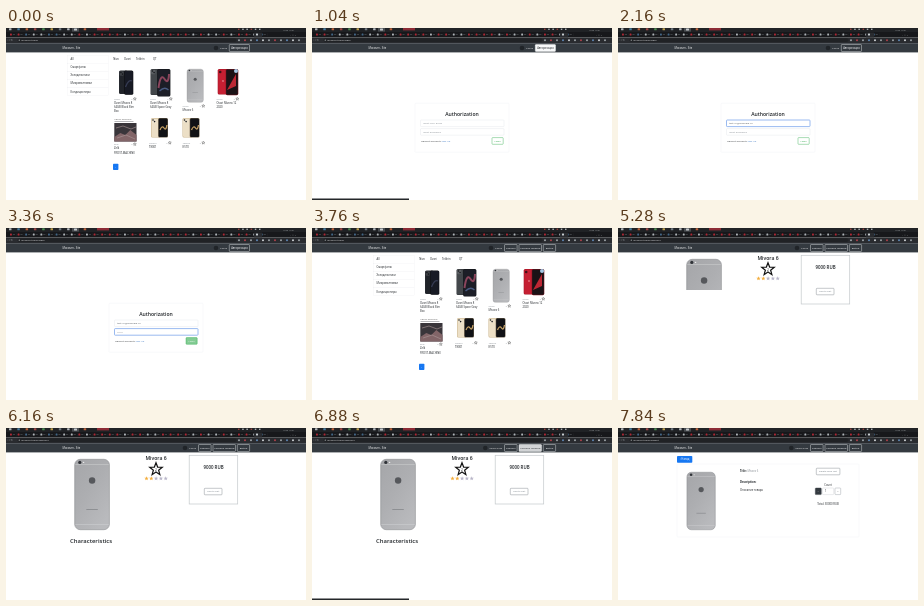
An HTML page that plays this animation: 300x172 px, repeating every 8000 ms.

```html
<!DOCTYPE html>
<html lang="ru">
<head>
<meta charset="utf-8">
<title>Магазин</title>
<style>
html, body { margin: 0; width: 100%; height: 100%; overflow: hidden; background: #fff; }
svg { display: block; width: 100%; height: 100%; }
text { font-family: "Open Sans", "Noto Sans", sans-serif; white-space: pre; }
</style>
</head>
<body>
<svg id="stage" viewBox="0 0 300 172"></svg>
<script>
const LOOP = 8000;
const INK = '#212529', MUTED = '#868c92', LINE = '#e1e4e7', BAR = '#343a40', BLUE = '#1677f2', GREEN = '#28a745';

// Markup helpers
const rect = (x, y, w, h, fill, more = '') =>
  `<rect x="${x}" y="${y}" width="${w}" height="${h}" fill="${fill}" ${more}/>`;
const disc = (x, y, r, fill, more = '') => `<circle cx="${x}" cy="${y}" r="${r}" fill="${fill}" ${more}/>`;
const text = (x, y, s, size = 2.7, fill = INK, more = '') =>
  `<text x="${x}" y="${y}" font-size="${size}" fill="${fill}" ${more}>${s}</text>`;
const swirl = (d, color, w) => `<path d="${d}" fill="none" stroke="${color}" stroke-width="${w}"/>`;
const mid = 'text-anchor="middle"', bold = 'font-weight="600"';
const outline = (x, y, w, h, color, fill = 'none', more = '') =>
  rect(x, y, w, h, fill, `rx=".7" stroke="${color}" stroke-width=".4" ${more}`);
const button = (id, x, y, w, h, label, color, size = 2.4) =>
  outline(x, y, w, h, color, 'transparent', `id="${id}"`) +
  text(x + w / 2, y + h / 2 + .8, label, size, color, `${mid} id="${id}Text"`);
const group = (id, s) => `<g id="${id}">${s}</g>`;

function star(x, y, r, fill, stroke = 'none', sw = 0) {
  const pts = Array.from({ length: 10 }, (_, i) => {
    const a = i * Math.PI / 5 - Math.PI / 2, k = i % 2 ? r * .42 : r;
    return (x + k * Math.cos(a)).toFixed(2) + ',' + (y + k * Math.sin(a)).toFixed(2);
  });
  return `<polygon points="${pts.join(' ')}" fill="${fill}" stroke="${stroke}" stroke-width="${sw}"/>`;
}

function seeded(seed) {
  return () => (seed = (seed * 16807) % 2147483647) / 2147483647;
}

// Browser frame
function chrome() {
  const rnd = seeded(41);
  let s = rect(0, 0, 300, 4, '#202225') + rect(0, 4, 300, 5.4, '#17181b') + rect(0, 9.4, 300, 5.8, '#292b2f');
  const apps = ['#b3b8bc', '#467c9f', '#b8613b', '#9c4746', '#4b8b51', '#b99d4d', '#727b83'];
  for (let i = 0; i < 10; i++) s += rect(3 + i * 8.3, .3, 2.5, 2, apps[i % 7], 'rx=".5"');
  s += rect(66, 0, 7, 3.6, '#484c50') + rect(68, .4, 3, 2, '#c4c8cb', 'rx=".5"');
  s += rect(91, 0, 12, 2.4, '#8c2b35');
  for (let i = 0; i < 6; i++) s += rect(232 + i * 4.2, .6, 1.5, 1.4, i % 3 ? '#a8adb0' : '#91423e');
  s += text(277, 2.6, '12:45  13.01', 2, '#b6babd');
  for (let i = 0; i < 34; i++) {
    const x = 4 + i * 7.6, c = rnd();
    s += rect(x, 5.6, 1.9, 1.9, c < .68 ? '#ad2834' : c < .86 ? '#aeb3b7' : '#426686', 'rx=".5"') +
      rect(x + 2.8, 6.2, 2.2, .6, '#55595d') + rect(x + 6.3, 5.2, .2, 3, '#34373b');
  }
  s += rect(248, 4.6, 8, 4.8, '#292b2f') + rect(250, 5.6, 2, 1.9, '#c7cdd1', 'rx=".5"');
  s += text(284, 7.7, '–  □  ×', 2.2, '#a2a6aa');
  s += text(1.5, 13.3, '‹ › ↻', 2.7, '#aeb2b6') + rect(11.5, 10.3, 219, 3.8, '#202225', 'rx="1.8"');
  s += disc(13.3, 12.2, .6, '#a2a6a9') + text(15.2, 13.1, '', 2.5, '#eceef0', 'id="url"');
  for (let i = 0; i < 11; i++) {
    s += disc(233 + i * 6, 12.2, 1.05, ['#979da1', '#a84049', '#979da1', '#5e83ad', '#c8cccf'][i % 5]);
  }
  return s;
}

function navbar() {
  return rect(0, 15.2, 300, 9.2, BAR) + text(56.5, 21, 'Магазин - Site', 2.65, '#fff') +
    group('cart', disc(0, 20, 2.3, '#202428') + text(4, 20.9, '0 RUB', 2.5, '#f1f1f1', 'id="sum"')) +
    group('guest', button('auth', 223.3, 16.5, 20.2, 7, 'Авторизация', '#f8f9fa', 2.6)) +
    group('member', button('room', 192.5, 16.5, 12.6, 7, 'Кабинет', '#f8f9fa') +
      button('basket', 207, 16.5, 22.5, 7, 'Корзина товаров', '#f8f9fa') +
      button('exit', 231.3, 16.5, 12.3, 7, 'Выйти', '#f8f9fa'));
}

// Product pictures
function silver(x, y, h) {
  return `<g transform="translate(${x} ${y}) scale(${h / 71})">` +
    rect(.4, .3, 34.7, 70.4, 'url(#metal)', 'rx="5.5" stroke="#8b8d91" stroke-width=".6"') +
    rect(1, 5.4, 33.5, .45, '#d3d4d6') + rect(1, 65.3, 33.5, .45, '#d3d4d6') +
    disc(5.5, 3.4, 1.6, '#303338') + disc(9.3, 3.4, .7, '#ececec') +
    disc(17.8, 21.5, 3.2, '#56585c') + rect(12, 50, 11.5, .8, '#85878b') + '</g>';
}
function slab(x, y, w, h, body, screen) {
  return rect(x, y, w, h, body, 'rx="1.6"') + rect(x + .5, y + .5, w - 1, h - 1, screen, 'rx="1.2"');
}
const lens = (x, y) => rect(x, y, 4.2, 4.5, '#ffffff22', 'rx="1"') +
  disc(x + 1.3, y + 1.3, .8, '#15171b') + disc(x + 2.9, y + 2.9, .8, '#15171b');
const duo = (x, y) => slab(x, y, 9.6, 19.5, '#cbb58e', '#ecdfc6') + lens(x + .7, y + .7) +
  slab(x + 7.2, y, 9.8, 19.5, '#6d604c', '#111216') +
  swirl(`M${x + 9} ${y + 12}q2-5 4-2t3-3`, '#c6a165', 1.3);

function card(x, y, brand, lines) {
  return text(x, y, brand, 2.4, MUTED) + star(x + 20.8, y - .8, 1.6, 'none', '#333', .35) +
    text(x + 17.2, y, '0', 2.1, MUTED) +
    lines.map((l, i) => text(x, y + 4.4 + i * 4.1, l)).join('');
}

function listPage() {
  let s = '';
  ['All', 'Смартфоны', 'Холодильники', 'Микроволновки', 'Кондиционеры'].forEach((name, i) => {
    s += rect(61.8, 27.1 + i * 8.15, 40.5, 8.15, '#fff', 'stroke="#e9ebed" stroke-width=".25"') +
      text(64.5, 31.9 + i * 8.15, name);
  });
  [[107.3, 'Nivo'], [118, 'Ovari'], [130, 'Teldrin'], [147, 'QT']].forEach(b => {
    s += text(b[0], 32, b[1]);
  });
  s += slab(113, 42.5, 8.500, 23.5, '#2b2e34', '#202329') + lens(113.6, 43.2) +
    slab(118.3, 42.5, 9, 24.3, '#0d0e11', '#171a24') + swirl('M119.5 59q3-8 6.500-6', '#353b52', 1.3);
  s += slab(144.5, 41, 10, 26, '#34373b', '#43474b') + lens(145.2, 41.7) +
    slab(151.2, 41, 13.2, 27.5, '#121418', '#1c1e27') +
    swirl('M152.5 60q2-15 6-9t4.500-5', '#8b455c', 2) + swirl('M153.5 63q5-5 9-1', '#485b82', 1.3);
  s += silver(180.8, 41, 33.5);
  s += slab(211.7, 41, 11, 25.5, '#a51425', '#c51f32') + disc(214.2, 44, 1.3, '#431018') +
    disc(217, 53, .9, '#e27880') + slab(219.7, 41, 12.6, 26.2, '#7d1421', '#1b1216') +
    '<path d="M221 62l9-16v12z" fill="#bd2734"/>' + disc(230, 43, 2, '#a4c8e5');
  s += card(108, 71.7, 'Ovari', ['Ovari Mivora 8', '64GB Black Slim', 'Box']) +
    card(144, 71.7, 'Ovari', ['Ovari Mivora 8', '64GB Space Gray']) +
    card(176.5, 78.8, 'Ovari', ['Mivora 6']) +
    card(210.5, 71.7, 'Ovari', ['Ovari Mivora 12', '2020']);
  s += rect(108.3, 95, 22.2, 18.5, '#39353a') + text(108.5, 92.4, 'FROST MACHINE', 2.2, '#444') +
    rect(108.5, 93.3, 19, .6, '#85858a') +
    '<path d="M108.3 109l6-4 5 2 5-5 6.200 5v6.500h-22.200z" fill="#826568"/>' +
    swirl('M110 100l7-2 8 3 5-2M111 110l9-3 9 4', '#ac9898', .6);
  s += duo(145, 90) + duo(176.5, 90);
  s += card(108, 117, 'Zelk', ['Zelk', 'FROST-MACHINE']) +
    card(143, 115.6, 'Teldrin', ['T8001']) + card(176.5, 115.6, 'Teldrin', ['K570']);
  return s + rect(107, 135.7, 5.4, 6.3, BLUE, 'rx=".7"') + text(109.7, 139.8, '1', 2.3, '#c9def8', mid);
}

function loginPage() {
  return outline(103, 75.2, 94, 49, '#eef0f2') +
    text(150, 88.3, 'Authorization', 5.1, INK, `${mid} ${bold}`) +
    outline(108.5, 92, 83.5, 6.6, LINE, '#fff', 'id="mailBox"') +
    outline(108.5, 100.6, 83.5, 6.6, LINE, '#fff', 'id="passBox"') +
    text(111, 96.2, '', 2.5, MUTED, 'id="mail"') + text(111, 104.8, '', 2.5, MUTED, 'id="pass"') +
    rect(132.7, 94, .25, 3, INK, 'id="caret"') +
    text(109, 114, 'Haven\'t account? <tspan fill="#467fc7">Sign Up</tspan>', 2.5) +
    button('login', 180, 109.6, 11.2, 6.7, 'Login', GREEN);
}

function productPage() {
  let s = `<g clip-path="url(#reveal)">${silver(68.3, 31, 71)}</g>` +
    text(150, 32.4, 'Mivora 6', 5.1, INK, `${mid} ${bold}`) +
    star(150, 41.3, 6.6, '#fff', '#111', 1.2) + text(150, 43, '2', 3.4, INK, mid);
  for (let i = 0; i < 5; i++) s += star(140.5 + i * 4.8, 50.5, 2.3, i < 2 ? '#f3ad3d' : '#b8b5c8');
  s += rect(183.2, 27.3, 48.5, 48.7, '#fff', 'stroke="#c4c8cb" stroke-width=".7"') +
    text(207.5, 41.4, '9000 RUB', 4.4, INK, `${mid} ${bold}`) +
    button('add', 198.3, 60.3, 17.7, 6.5, 'Add to cart', '#6c757d');
  return s + text(64, 114.6, 'Characteristics', 5.9, INK, `${bold} id="specs"`);
}

function cartPage() {
  return rect(59, 28, 15.3, 6.8, BLUE, 'rx=".8"') + text(66.6, 32.3, '‹ Назад', 2.8, '#fff', mid) +
    outline(59, 36, 182, 73, '#eef0f2') + silver(68.6, 44, 58) +
    text(122, 44.2, `<tspan font-weight="700">Title:</tspan> <tspan fill="${MUTED}">Mivora 6</tspan>`) +
    text(122, 55.4, 'Description:', 2.7, INK, 'font-weight="700"') + text(122, 63.4, 'Описание товара') +
    button('drop', 198.3, 40.2, 23.6, 6.6, 'Delete from cart', '#6c757d') +
    text(210, 58.2, 'Count', 2.7, INK, mid) +
    outline(197.3, 60, 6, 6.6, BAR, BAR) + text(200.3, 64.1, '−', 2.5, '#fff', mid) +
    outline(204.5, 60, 11.2, 6.6, '#c9cdd1') + text(207, 64.2, '1', 2.7) +
    outline(217, 60, 5.7, 6.6, '#8f969d') + text(219.9, 64.1, '+', 2.5, INK, mid) +
    text(210, 77.2, 'Total: 30000 RUB', 2.75, INK, mid);
}

const stage = document.getElementById('stage');
stage.innerHTML = `<defs>
  <linearGradient id="metal" x2=".7" y2="1"><stop stop-color="#a5a6a9"/><stop offset=".5" stop-color="#adaeb1"/>
  <stop offset="1" stop-color="#b9babd"/></linearGradient>
  <clipPath id="reveal"><rect id="cut" x="60" y="27" width="50" height="80"/></clipPath></defs>` +
  rect(0, 0, 300, 172, '#fff') + group('list', listPage()) + group('signin', loginPage()) +
  group('product', productPage()) + group('order', cartPage()) + chrome() + navbar() +
  rect(0, 170.5, 97, 1.5, '#24272a', 'id="status"');

const el = {};
stage.querySelectorAll('[id]').forEach(n => el[n.id] = n);
const show = (id, on) => el[id].setAttribute('display', on ? 'inline' : 'none');
const set = (id, key, value) => el[id].setAttribute(key, value);
const write = (id, s) => { if (el[id].textContent !== s) el[id].textContent = s; };
const ramp = (t, a, b) => Math.max(0, Math.min(1, (t - a) / (b - a)));
const pulse = (t, a, b) => ramp(t, a, a + 150) * (1 - ramp(t, b, b + 150));
const within = (t, a, b) => t >= a && t < b;

function fill(id, k, color, from, to) {
  set(id, 'fill', color);
  set(id, 'fill-opacity', k);
  set(id + 'Text', 'fill', k > .5 ? to : from);
}
function focus(id, k) {
  set(id, 'stroke', k > .5 ? '#80a9ed' : LINE);
  set(id, 'stroke-width', .4 + k * .4);
}

function draw(t) {
  const page = t < 480 ? 'list' : t < 3440 ? 'signin' : t < 5160 ? 'list' : t < 7280 ? 'product' : 'order';
  const paths = { list: '', signin: '/login', product: '/device/3', order: '/basket' };
  for (const id in paths) show(id, id === page);
  write('url', 'localhost:3000' + paths[page]);

  const member = t >= 3440, paid = t >= 6600;
  show('guest', !member);
  show('member', member);
  set('cart', 'transform', `translate(${paid ? 173.3 : member ? 179 : 210} 0)`);
  write('sum', paid ? '30000 RUB' : '0 RUB');
  fill('auth', pulse(t, 60, 1120), '#f8f9fa', '#f8f9fa', INK);
  fill('basket', pulse(t, 6760, 7440), '#f8f9fa', '#f8f9fa', INK);
  fill('add', pulse(t, 6280, 6560), '#6c757d', '#6c757d', '#fff');
  fill('login', ramp(t, 3200, 3480), GREEN, GREEN, '#fff');
  show('status', within(t, 320, 1120) || within(t, 6800, 7280));

  const mail = 'test-31@example.ru', typed = Math.floor(mail.length * ramp(t, 1240, 1520));
  write('mail', typed ? mail.slice(0, typed) : 'Input your Email');
  const dots = Math.floor(6 * ramp(t, 2640, 2960));
  write('pass', dots ? '•'.repeat(dots) : 'Input password');
  set('mail', 'fill', typed ? '#495057' : MUTED);
  set('pass', 'fill', dots ? '#495057' : MUTED);
  focus('mailBox', pulse(t, 1160, 2240));
  focus('passBox', ramp(t, 2240, 2390));
  show('caret', within(t, 1520, 1920));

  const loaded = t >= 5520;
  set('cut', 'height', loaded ? 80 : 35);
  show('specs', loaded);
}

function tick() {
  draw(performance.now() % LOOP);
  requestAnimationFrame(tick);
}
tick();
</script>
</body>
</html>
```
